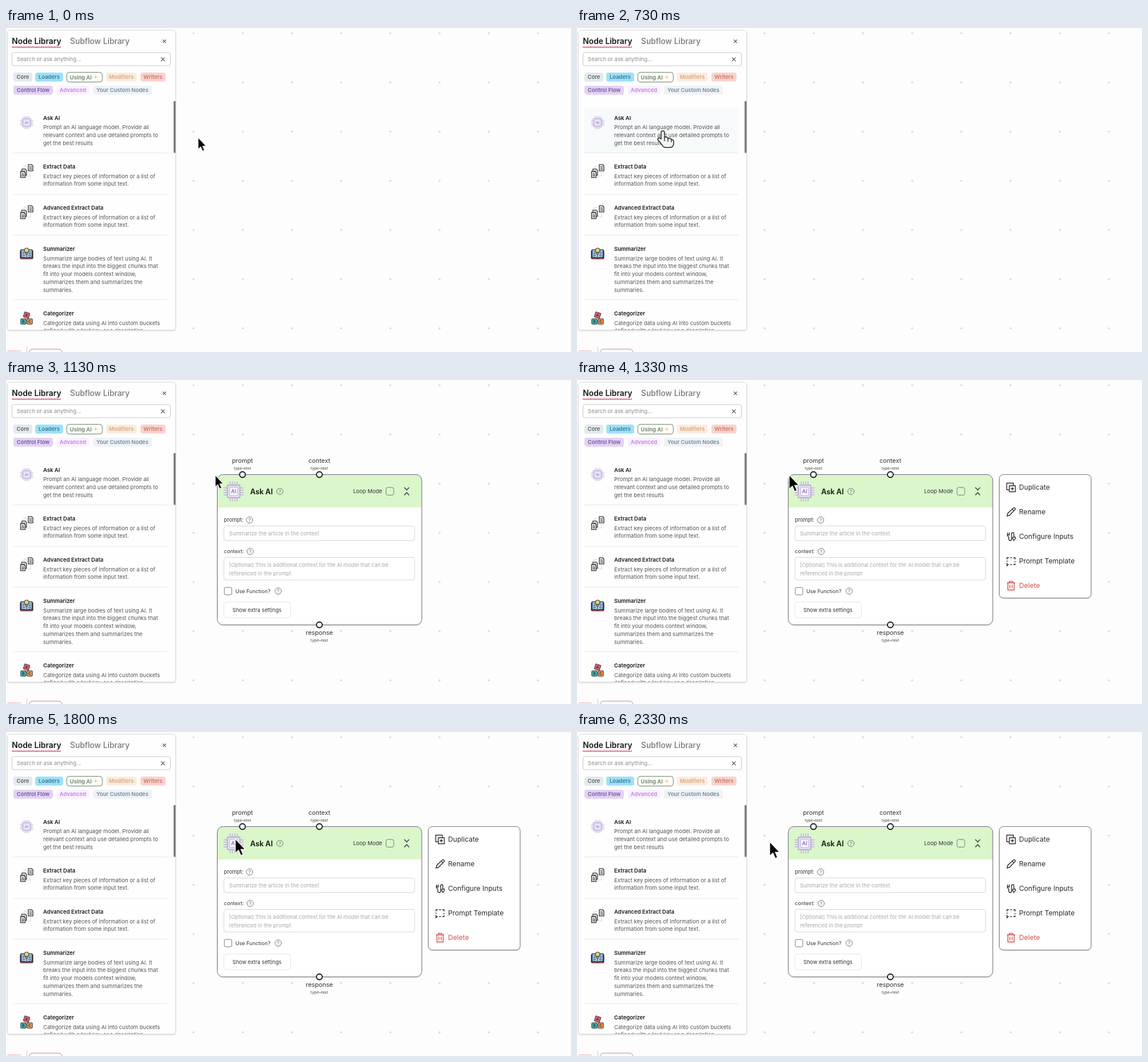
An HTML page for the animation above (2390 ms loop, 988 px wide and 567 px high).

```html
<!DOCTYPE html>
<html>
<head>
<meta charset="utf-8">
<style>
html, body { margin: 0; width: 100%; height: 100%; overflow: hidden; background: #fdfdfd; }
svg { display: block; font-family: Inter, sans-serif; }
</style>
</head>
<body>
<svg id="stage" width="988" height="567" viewBox="0 0 988 567"></svg>
<script>
const LOOP = 2390, HOVER = 440, GRAB = 740, DROP = 1070, MENU = 1270;

const text = (x, y, s, size, fill, weight = 400, extra = '') =>
  `<text x="${x}" y="${y}" font-size="${size}" fill="${fill}" font-weight="${weight}" ${extra}>${s}</text>`;
const box = (x, y, w, h, r, fill, stroke = 'none', extra = '') =>
  `<rect x="${x}" y="${y}" width="${w}" height="${h}" rx="${r}" fill="${fill}" stroke="${stroke}" ${extra}/>`;
const line = (d, stroke, width = 1, extra = '') =>
  `<path d="${d}" fill="none" stroke="${stroke}" stroke-width="${width}" ${extra}/>`;
const place = (x, y, body, scale = 1) => `<g transform="translate(${x} ${y}) scale(${scale})">${body}</g>`;
const middle = 'text-anchor="middle"';

// Icons, each centred on 0,0
function chip() {
  let pins = '';
  for (const p of [-4, -1.4, 1.4, 4])
    pins += `M${p} -8V-11.5M${p} 8V11.5M-8 ${p}H-11.5M8 ${p}H11.5`;
  return line(pins, '#b9a3dc', .8) + box(-7.3, -7.3, 14.6, 14.6, 1, '#e6def3', '#a08ccb', 'stroke-width=".8"') +
    box(-4.8, -4.8, 9.6, 9.6, .6, '#f6f2fc', '#b9a3dc', 'stroke-width=".6"') +
    text(0, 2.1, 'AI', 5.8, '#8d6fc4', 600, middle);
}
function docs() {
  const sheet = (x, y) => place(x, y,
    `<path d="M-4 -5.3H2L4 -3V5.3H-4Z" fill="#fff" stroke="#2b2b2b" stroke-width="1.3"/>` +
    line('M-2.2 -2H2M-2.2 .3H2.3M-2.2 2.6H2.3', '#333', 1.1));
  return line('M-5 -5.5V-9H1M2 8H7V1', '#999', .7, 'stroke-dasharray="1.5 1"') +
    sheet(7, -6.5) + sheet(-4.2, 1.2) + sheet(-6.5, 5.3);
}
function book() {
  return box(-11, -6, 22, 15, 1.5, '#b8433f', '#252b45', 'stroke-width="1.2"') +
    '<path d="M-9.5 -7Q-4 -8 0 -4Q4 -8 9.5 -7V6.5Q4 5.5 0 8Q-4 5.5 -9.5 6.5Z" fill="#a9cfe4" stroke="#252b45" stroke-width="1.2"/>' +
    line('M0 -3V8M-7.5 -3H-3M-7.5 0H-3M-7.5 3H-3M3 -3H7.5M3 0H7.5M3 3H7.5', '#2c3858', 1.1) +
    '<circle cy="-6" r="4" fill="#f4cf5c" stroke="#252b45"/>' + box(-1.5, -2, 3, 3, 0, '#e7a83c', '#252b45', 'stroke-width=".7"');
}
function blocks() {
  const block = (x, y, letter, color, turn) => `<g transform="translate(${x} ${y}) rotate(${turn})">` +
    box(-4.7, -4.7, 9.4, 9.4, 1, color, '#343434') + text(0, 2.3, letter, 6.5, '#333', 700, middle) + '</g>';
  return block(0, -5.5, 'A', '#ef5a61', 18) + block(-5.5, 5.6, 'B', '#35b9b9', 0) + block(5.5, 5.6, 'C', '#f3944c', 0);
}
const help = (x, y) => `<circle cx="${x}" cy="${y}" r="5.5" fill="none" stroke="#666" stroke-width=".9"/>` +
  text(x, y + 2.9, '?', 8, '#555', 400, middle);
const cross = (x, y, r) => line(`M${x - r} ${y - r}l${2 * r} ${2 * r}m0 ${-2 * r}l${-2 * r} ${2 * r}`, '#555', 1.1);

function item(y, title, lines, icon) {
  return place(36, y + 8.5, icon) + text(65, y + 3.5, title, 9.5, '#1a1a1a', 600) +
    lines.map((s, i) => text(65, y + 20 + i * 13.75, s, 9.55, '#545454')).join('');
}
const askItem = item(157, 'Ask AI', ['Prompt an AI language model. Provide all',
  'relevant context and use detailed prompts to', 'get the best results'], chip());

function grid() {
  let d = '';
  for (let i = 0; i < 8; i++) for (let j = 0; j < 7; j++)
    d += `M${325.7 + i * 86.03} ${9.2 + j * 86.07}h4.6m-2.3 -2.3v4.6`;
  return line(d, '#cfcfcf', .9);
}

function panel() {
  const extract = ['Extract key pieces of information or a list of', 'information from some input text.'];
  const chips = [
    [13, 78, 33, 'Core', '#e3e9ed', '#56626b'], [51, 78, 49, 'Loaders', '#9fe0f6', '#37799a'],
    [175, 78, 53.5, 'Modifiers', '#fdebdd', '#dfa67e'], [235, 78, 44, 'Writers', '#fad3cd', '#d0736b'],
    [13, 101, 69, 'Control Flow', '#e2d2f3', '#7452a2'], [89, 101, 56, 'Advanced', '#f9f1fd', '#c183e0'],
    [152, 101, 103, 'Your Custom Nodes', '#eef3f7', '#7b8794']];
  return box(2.5, 4, 294, 524.5, 4, '#fefefe', '#dedede', 'filter="url(#soft)"') +
    text(10.3, 27.7, 'Node Library', 13.8, '#161616', 600) + text(112, 27.7, 'Subflow Library', 13.8, '#777', 500) +
    line('M10 33.5H96', '#d3476f', 1.3) + cross(277, 23.3, 2.8) +
    box(10.5, 43, 277, 23, 3, '#fff', '#c6c6c6') +
    text(19, 58, 'Search or ask anything...', 9.6, '#8b8b8b') + cross(274.3, 54.7, 3.3) +
    chips.map(([x, y, w, s, bg, fg]) =>
      box(x, y, w, 15.7, 4, bg) + text(x + w / 2, y + 11.2, s, 9.45, fg, 600, middle)).join('') +
    box(106.3, 77.7, 62, 16.8, 4, '#fff', '#66805f') + text(111.5, 89.6, 'Using AI', 9.5, '#66805a', 600) +
    '<path d="M157 82l1 3 3 1-3 1-1 3-1-3-3-1 3-1Z" fill="#f3d27c"/>' +
    '<g clip-path="url(#list)">' +
    '<rect id="hover" x="13" y="139" width="269" height="79" rx="4" fill="#f7fafb"/>' + askItem +
    item(242.5, 'Extract Data', extract, docs()) + item(314.5, 'Advanced Extract Data', extract, docs()) +
    item(386.5, 'Summarizer', ['Summarize large bodies of text using AI. It', 'breaks the input into the biggest chunks that',
      'fit into your models context window,', 'summarizes them and summarizes the', 'summaries.'], book()) +
    item(499.5, 'Categorizer', ['Categorize data using AI into custom buckets',
      'defined with a text key or a description.'], blocks()) +
    line('M13 218.5H282M13 291H282M13 362.5H282M13 475.5H282', '#e6e6e6') + '</g>' +
    box(293, 128, 3.6, 90.5, 0, '#7e7e7e') +
    box(2.5, 564.5, 23, 9, 3, '#fbe3e9', '#efbfcb') + line('M36.5 558V567', '#ccc') +
    box(40.5, 562, 57.5, 20, 6, '#fff', '#c9788f');
}

function node() {
  const port = (x, y, name, labelY) => `<circle cx="${x}" cy="${y}" r="5" fill="#fff" stroke="#111" stroke-width="1.8"/>` +
    text(x, labelY, name, 10.8, '#333', 400, middle) + text(x, labelY + 12.5, 'type=text', 6.7, '#444', 400, middle);
  return box(369.5, 165.5, 357.5, 263, 10, '#fff', 'none', 'filter="url(#soft)"') +
    '<path d="M369.5 223V175.5a10 10 0 0 1 10-10H717a10 10 0 0 1 10 10V223Z" fill="#dbf6cb"/>' +
    box(369.5, 165.5, 357.5, 263, 10, 'none', '#6c6c78') +
    place(398, 195, chip(), 1.52) + text(427, 199.6, 'Ask AI', 12.6, '#1d2b18', 700) + help(479, 195) +
    text(607, 198, 'Loop Mode', 9.5, '#333') + box(664.5, 188, 13.5, 13.5, 3, 'none', '#6f7f69') +
    line('M696.5 188l4.2 4.5 4.2-4.5M696.5 201.5l4.2-4.5 4.2 4.5', '#333', 1.4) +
    port(413.5, 165.5, 'prompt', 144.7) + port(548, 165.5, 'context', 144.7) + port(548, 428.5, 'response', 445.5) +
    text(381, 248.3, 'prompt:', 9.3, '#333') + help(426, 245) +
    box(381, 255.5, 333.5, 25.5, 4, '#fff', '#d4d4d4') +
    text(390, 272, 'Summarize the article in the context', 9.28, '#a9a9a9') +
    text(381, 303.3, 'context:', 9.1, '#333') + help(427, 300) +
    box(381, 310.5, 333.5, 39.5, 4, '#fff', '#d4d4d4') +
    text(390, 327.3, '[Optional] This is additional context for the AI model that can be', 9.28, '#a9a9a9') +
    text(390, 341.8, 'referenced in the prompt', 9.28, '#a9a9a9') +
    box(381.8, 363, 13, 13, 2.5, '#fff', '#777') + text(401, 372.5, 'Use Function?', 9.15, '#333') + help(476, 369.3) +
    box(381, 388.5, 116.5, 27.5, 4, '#fff', '#e4e4e4') + text(396, 405.8, 'Show extra settings', 9.2, '#333');
}

function menu() {
  const rows = [
    ['Duplicate', 'M-3 -3H7.5V7.5H-3ZM-3 4H-7.5V-7.5H4V-3M2.2 -.5V5M-.5 2.2H5'],
    ['Rename', 'M-7 7L-5.5 2L4 -7Q6 -8 7.2 -6.5Q8 -5 6.5 -3.5L-3 6ZM2 -5L5 -2'],
    ['Configure Inputs', 'M-6 -7V-2Q-6 0 -4 1V4Q-4 7 -1.5 7T1 4V-4Q1 -7 3 -7T5 -4V0M-7.5 -3H-3M-3 -7V-2M3 1H7.5V4L5 6V8M3 1V4L5 6'],
    ['Prompt Template', 'M-7 -3V-6H-4M-1.5 -6H1.5M4 -6H7V-3M7 0V2M7 4V6H4M1.5 6H-1.5M-4 6H-5L-7 8V3M-7 1V-1'],
    ['Delete', 'M-7 -5H7M-3 -5V-7.5H3V-5M-5.5 -5V7.5H5.5V-5M-2 -2V4.5M2 -2V4.5']];
  return box(738.5, 165.5, 160.5, 216, 7, '#fff', '#74747a', 'filter="url(#soft)"') +
    rows.map(([name, icon], i) => {
      const y = 188 + i * 43, color = i == 4 ? '#d2504f' : '#2b2b2b';
      return place(759, y, line(icon, color, 1.4)) + text(773, y + 4.3, name, 12.1, color);
    }).join('');
}

const cursors =
  '<path id="arrow" d="M0 0V25L5.6 19.8L9.6 29L13.6 27.3L9.7 18.3H17.3Z" fill="#050505" stroke="#fff" stroke-width="1.2"/>' +
  '<g id="point" stroke="#222" stroke-width="1.5"><path fill="#f4f4f4" d="M0 -3a3 3 0 0 1 6 0v8q5-1 6 2q5-1 6 2q4 0 4 4v3q0 7-7 7h-7q-4 0-6-4l-8-10q1-4 5-2l1 1z"/>' +
  line('M6 5V12M12 7V13M18 9V14', '#222', 1.3) + '</g>' +
  '<g id="fist" transform="translate(-4.5 17)"><path fill="#555" stroke="#222" stroke-width="1.6" d="M-9 -5q2-4 4-1q3-4 5 0q3-3 5 1q4-1 4 3v4q0 7-6 7h-6q-4 0-5-4l-2-5z"/>' +
  line('M-6 6H6', '#aaa', 2.4) + '</g>';

const stage = document.getElementById('stage');
stage.innerHTML = `<defs>
  <clipPath id="list"><rect x="3" y="128" width="290" height="400"/></clipPath>
  <filter id="soft" x="-10%" y="-10%" width="120%" height="125%"><feDropShadow dx="0" dy="1" stdDeviation="1.3" flood-opacity=".18"/></filter>
  <filter id="lift" x="-10%" y="-20%" width="120%" height="150%"><feDropShadow dx="1" dy="2" stdDeviation="3" flood-opacity=".42"/></filter>
  <filter id="smear" x="-50%" y="-50%" width="200%" height="200%"><feGaussianBlur id="blur"/></filter>
  </defs>` + grid() + panel() +
  `<g id="node">${node()}</g><g id="menu">${menu()}</g>` +
  `<g id="card"><g opacity=".88">${box(13, 139, 269.5, 79.5, 3, '#f8fbfb', 'none', 'filter="url(#lift)"')}</g><g opacity=".85">${askItem}</g></g>` +
  `<g id="cursor">${cursors}</g>`;

const part = id => document.getElementById(id);
const show = (id, on) => part(id).setAttribute('visibility', on ? 'visible' : 'hidden');

// time, x, y, arrow scale
const path = [[0, 336, 192, .8], [350, 336, 192, .8], [700, 147, 186, .8], [760, 147, 186, .8], [1070, 368, 167, .8],
  [1130, 366, 167, .8], [1330, 371, 166, 1], [1420, 371, 166, 1], [1720, 401, 187, 1], [1860, 401, 187, 1],
  [2250, 337, 192, 1], [LOOP, 337, 192, 1]];

function pointer(t) {
  const i = Math.max(1, path.findIndex(k => k[0] >= t)), a = path[i - 1], b = path[i];
  const u = (t - a[0]) / (b[0] - a[0]), s = u * u * (3 - 2 * u);
  return [1, 2, 3].map(n => a[n] + (b[n] - a[n]) * s);
}

function draw(t) {
  const [x, y, scale] = pointer(t), near = pointer(Math.max(0, t - 10));
  const dragging = t >= GRAB && t < DROP, hand = t >= HOVER && t < DROP;
  const smear = Math.min(2.2, Math.hypot(x - near[0], y - near[1]) * .22);
  show('hover', hand);
  show('card', dragging);
  show('node', t >= DROP);
  show('menu', t >= MENU);
  show('arrow', !hand);
  show('point', hand && !dragging);
  show('fist', dragging);
  part('card').setAttribute('transform', `translate(${x - 147} ${y - 186})`);
  part('cursor').setAttribute('transform', `translate(${x} ${y}) scale(${hand ? 1 : scale})`);
  part('blur').setAttribute('stdDeviation', `${smear} ${smear * .4}`);
  if (smear > .3) part('cursor').setAttribute('filter', 'url(#smear)');
  else part('cursor').removeAttribute('filter');
}

const start = performance.now();
function tick() {
  draw((performance.now() - start) % LOOP);
  requestAnimationFrame(tick);
}
draw(0);
tick();
</script>
</body>
</html>
```
